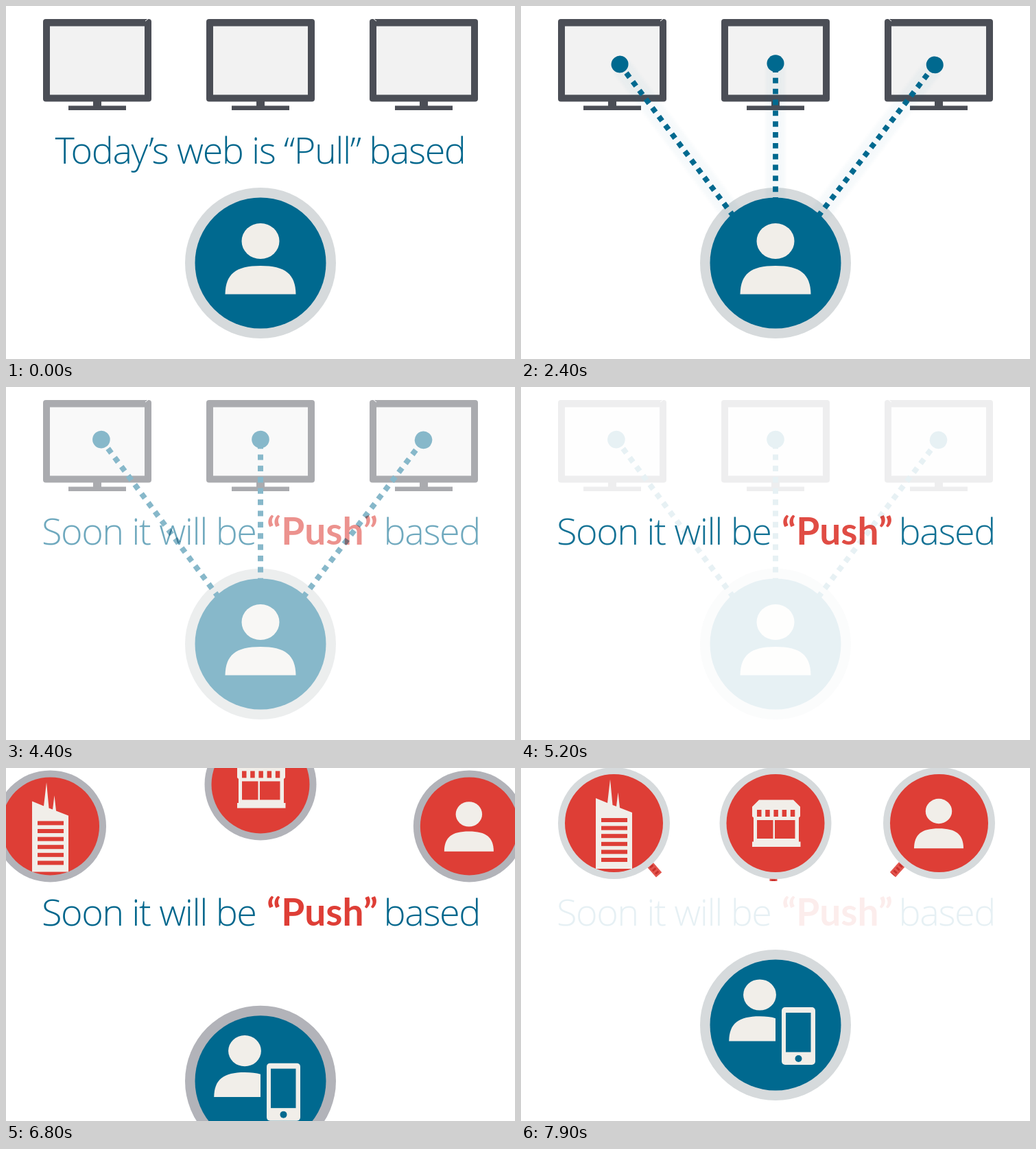
Write an HTML page that moves like this. It is 742 px wide and 515 px high and loops after 8 s.

```html
<!DOCTYPE html>
<html lang="en">
<head>
<meta charset="utf-8">
<title>Pull and push</title>
<style>
  html, body { margin: 0; height: 100%; overflow: hidden; background: #fff; }
  svg { display: block; width: 742px; height: 515px; }
  text { font: 300 54px "Open Sans", "Noto Sans", sans-serif; letter-spacing: -.027em; fill: #00668c; }
  .push { font: 700 55px Lato, sans-serif; letter-spacing: 0; fill: #de3e36; }
  .caption { mix-blend-mode: multiply; }
</style>
</head>
<body>
<svg id="stage" viewBox="0 0 742 515"></svg>
<script>
const LOOP = 8000, STEP = 100;
const BLUE = '#00698f', RED = '#de3e36', CREAM = '#f1eee9', SLATE = '#4b4e56';

const clamp = x => Math.max(0, Math.min(1, x));
const ramp = (t, from, to) => clamp((t - from) / (to - from));
const smooth = u => u * u * (3 - 2 * u);
const easeOut = u => 1 - (1 - u) ** 2;
const mix = (a, b, k) => a + (b - a) * k;

const rect = (x, y, w, h, fill, r = 0) =>
  `<rect x="${x}" y="${y}" width="${w}" height="${h}" rx="${r}" fill="${fill}"/>`;
const disc = (x, y, r, fill, extra = '') =>
  `<circle cx="${x}" cy="${y}" r="${r}" fill="${fill}" ${extra}/>`;

// Placed by the centre of the head.
const head = `<ellipse rx="27.5" ry="26"/>`;
const body = `<path d="M-51.5 77.5C-51 48 -36 36 0 36S51 48 51.5 77.5Z"/>`;
const figure = (x, y, scale, parts) =>
  `<g transform="translate(${x} ${y}) scale(${scale})" fill="${CREAM}">${parts}</g>`;
const person = (x, y, scale) => figure(x, y, scale, head + body);

const monitor = (x, tick) => `<g transform="translate(${x} 19)">
  ${rect(0, 0, 158, 120.5, SLATE, 4)}${rect(10, 10.5, 138, 100, '#f2f2f2')}
  ${rect(73, 120, 12, 8, SLATE)}${rect(37, 126.5, 84, 6.5, SLATE)}
  <path d="${tick}" stroke="#fff" fill="none"/></g>`;

const building = () => {
  const windows = [0, 1, 2, 3, 4, 5].map(i => rect(-18.5, -7.5 + i * 11.6, 38, 6, RED)).join('');
  return `<path fill="${CREAM}" d="M-26.5 66.5V-36.5L-9.5 -29.5L-5.5 -64L-2 -26.5L3.5 -24.5L6 -45L8.5 -22.5L26.5 -15.5V66.5Z"/>${windows}`;
};

const shop = () => {
  const slots = [0, 1, 2, 3, 4].map(i => rect(-27 + i * 12.2, -19.5, 6.5, 10, RED)).join('');
  return `<path fill="${CREAM}" d="M-24 -34H26L36 -24V-10L34 -8V27H36.5V34.5H-34V27H-32V-8L-34 -10V-24Z"/>
    ${slots}${rect(-27, -4.5, 23.5, 27, RED)}${rect(-1, -4.5, 29.5, 27, RED)}`;
};

const phoneUser = () => `<clipPath id="half"><rect x="-90" y="-90" width="90" height="180"/></clipPath>
  <g clip-path="url(#half)">${figure(-23, -44, .87, body)}</g>${figure(-23, -44, .87, head)}
  ${rect(9, -26, 49, 84, CREAM, 5)}${rect(15, -18, 36.5, 57.5, BLUE)}${disc(33.5, 49, 5, BLUE)}`;

const badge = (id, outer, inner, fill, icon) =>
  `<g id="${id}">${disc(0, 0, outer, '#d6dadc', 'class="ring"')}${disc(0, 0, inner, fill)}${icon}</g>`;

// Dotted connectors: base point, final angle, final length, direction of the extra tilt.
const pulls = [
  { x: 310, y: 307, angle: -36.6, length: 287, tilt: -1 },
  { x: 371, y: 287, angle: 0, length: 210.5, tilt: 0 },
  { x: 433, y: 307, angle: 37.4, length: 289, tilt: 1 },
];
const pullMarkup = ({ length }, i) => `<g id="pull${i}">
  <line class="glow" stroke="${BLUE}" filter="url(#blur)"/>
  <g class="dots"><line y2="${-length + 8}" stroke="${BLUE}" stroke-width="8" stroke-dasharray="8.2"/>
  ${disc(0, -length, 12.8, BLUE)}</g></g>`;

// Badges: resting place, entry displacement.
const badges = [
  { id: 'office', x: 135.5, y: 80.5, dx: -306, dy: 19 },
  { id: 'store', x: 371, y: 80.5, dx: 0, dy: -244 },
  { id: 'buyer', x: 609.5, y: 80.5, dx: 284, dy: 19 },
  { id: 'mobile', x: 371, y: 375, dx: 0, dy: 352 },
];
// Red connectors leaving the upper badges.
const pushes = [
  { x: 135.5, angle: -41, reach: 19 },
  { x: 368, angle: 0, reach: 3.5 },
  { x: 609.5, angle: 42, reach: 20 },
];
const pushMarkup = ({ x, angle }, i) => `<g transform="translate(${x} 80.5) rotate(${angle})">
  <line id="push${i}" stroke="#e2544d" stroke-width="11"/>
  <line id="dash${i}" stroke="#c9302c" stroke-width="6" stroke-dasharray="3"/></g>`;

const stage = document.getElementById('stage');
stage.innerHTML = `
  <filter id="blur" filterUnits="userSpaceOnUse" x="-40" y="-330" width="80" height="370">
    <feGaussianBlur stdDeviation="2"/></filter>
  <g id="pullScene">
    ${monitor(54, 'M149 3L153 0')}${monitor(292, '')}${monitor(530, 'M6 0L10 3')}
    ${disc(371, 375, 110, '#d6dadc')}
    ${pulls.map(pullMarkup).join('')}
    ${disc(371, 375, 95.5, BLUE)}${person(371, 343, 1)}
  </g>
  <g id="pushScene">
    ${pushes.map(pushMarkup).join('')}
    ${badge('office', 81.5, 71.5, RED, building())}
    ${badge('store', 81.5, 71.5, RED, shop())}
    ${badge('buyer', 81.5, 71.5, RED, person(-.5, -17.5, .7))}
    ${badge('mobile', 110, 95.5, BLUE, phoneUser())}
  </g>
  <text id="pullText" class="caption" x="370.5" y="230" text-anchor="middle">Today’s web is “Pull” based</text>
  <g id="pushText" class="caption">
    <text x="52" y="230">Soon it will be</text>
    <text class="push" x="461" y="230" text-anchor="middle">“Push”</text>
    <text x="691" y="230" text-anchor="end">based</text>
  </g>`;

const $ = id => document.getElementById(id);
const set = (el, attrs) => { for (const k in attrs) el.setAttribute(k, attrs[k]); };
const rings = stage.querySelectorAll('.ring');

function draw(t) {
  set($('pullText'), { opacity: 1 - ramp(t, 100, 1000) });
  set($('pushText'), { opacity: Math.min(ramp(t, 3150, 5350), 1 - ramp(t, 7000, 8000)) });
  set($('pullScene'), { opacity: 1 - ramp(t, 3280, 5400) });

  const grow = easeOut(ramp(t, 640, 2800));
  pulls.forEach(({ x, y, angle, length, tilt }, i) => {
    const el = $('pull' + i), turn = angle + tilt * 5.5 * (1 - grow);
    set(el, {
      transform: `translate(${x} ${y}) rotate(${turn}) scale(${mix(.45, 1, grow)} ${grow})`,
      visibility: grow > 0 ? 'visible' : 'hidden',
    });
    set(el.querySelector('.glow'), {
      y2: -length * mix(.55, 1, grow), 'stroke-width': mix(16, 30, grow), opacity: .9 * (1 - grow),
    });
    set(el.querySelector('.dots'), { opacity: clamp(.1 + .95 * grow) });
  });

  const away = 1 - smooth(ramp(t, 5700, 7300));
  set($('pushScene'), { visibility: t > 5700 ? 'visible' : 'hidden' });
  badges.forEach(({ id, x, y, dx, dy }) =>
    set($(id), { transform: `translate(${x + dx * away} ${y + dy * away})` }));
  const k = ramp(t, 6800, 7300);
  const ring = `rgb(${mix(178, 214, k)},${mix(179, 218, k)},${mix(185, 220, k)})`;
  rings.forEach(el => set(el, { fill: ring }));

  const out = ramp(t, 7700, 7900);
  pushes.forEach(({ reach }, i) => {
    const y2 = 81 + reach * out;
    for (const name of ['push', 'dash'])
      set($(name + i), { y1: 76, y2, visibility: out > 0 ? 'inherit' : 'hidden' });
  });
}

const start = performance.now();
function frame() {
  const t = (performance.now() - start) % LOOP;
  draw(Math.floor(t / STEP) * STEP);
  requestAnimationFrame(frame);
}
frame();
</script>
</body>
</html>
```
